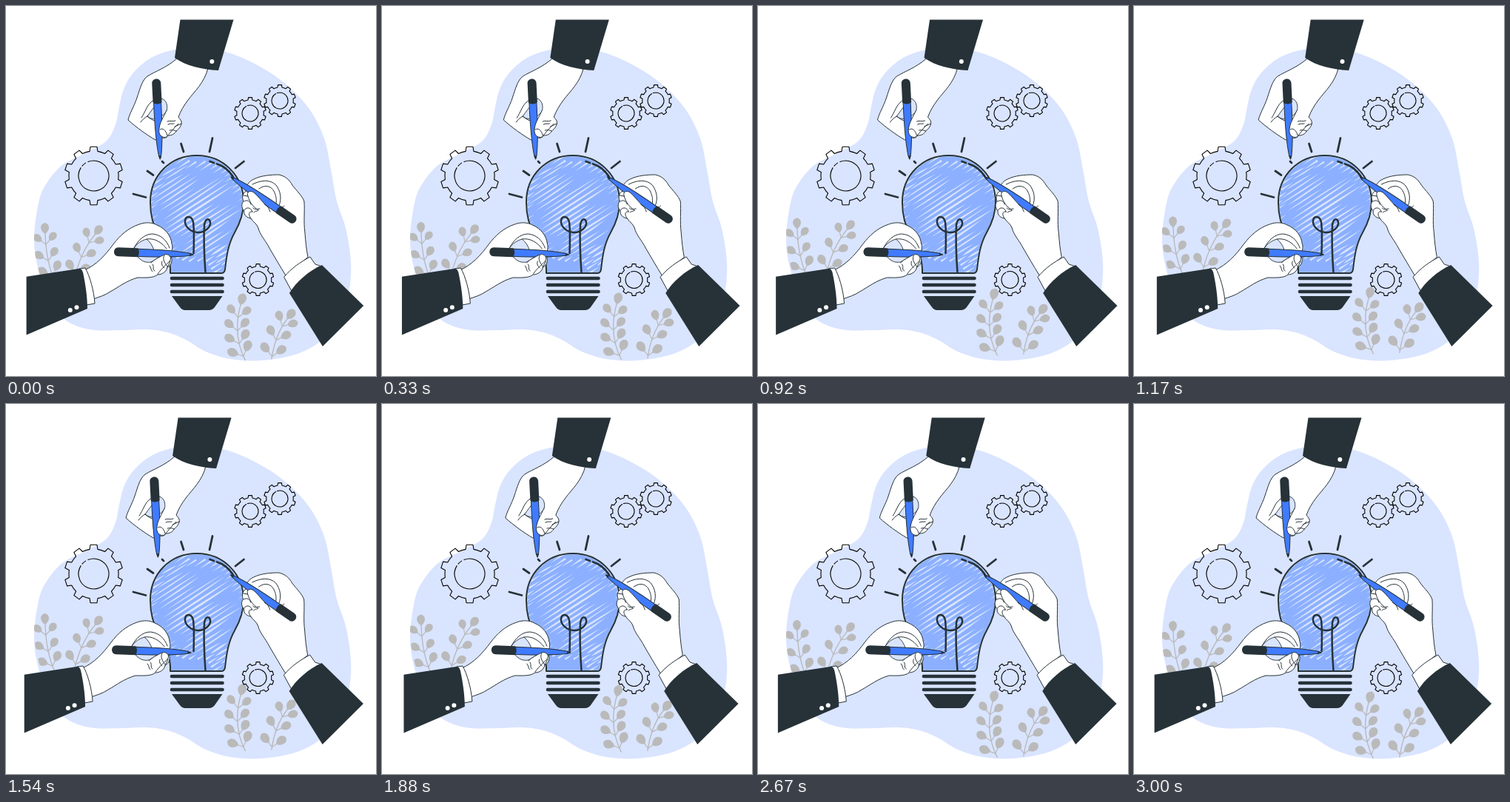
Write an HTML page with a canvas that moves like this. It is 500 px wide and 500 px high and loops after 3040 ms.

```html
<!DOCTYPE html>
<html>
<head>
<meta charset="utf-8">
<style>
html, body { margin: 0; width: 100%; height: 100%; overflow: hidden; background: #fff; }
canvas { display: block; width: 500px; height: 500px; }
</style>
</head>
<body>
<canvas id="stage"></canvas>
<script>
const LOOP = 3040, CYCLE = 3000;
const INK = '#263238', BLUE = '#407bff', PALE = '#d9e4ff', MID = '#8cb0ff', GREY = '#bababa', WHITE = '#fff';

const cv = document.getElementById('stage');
const dpr = window.devicePixelRatio || 1;
cv.width = cv.height = 500 * dpr;
const c = cv.getContext('2d');
c.lineCap = c.lineJoin = 'round';

function shape(d, fill, stroke, width = 1) {
  const p = typeof d === 'string' ? new Path2D(d) : d;
  if (fill) { c.fillStyle = fill; c.fill(p); }
  if (stroke) { c.strokeStyle = stroke; c.lineWidth = width; c.stroke(p); }
}
const line = (d, width = 1, color = INK) => shape(d, null, color, width);
const skin = d => shape(d, WHITE, INK, 1);

function dot(x, y, r, color) {
  const p = new Path2D();
  p.arc(x, y, r, 0, 7);
  shape(p, color);
}

function group(x, y, angle, draw) {
  c.save();
  c.translate(x, y);
  c.rotate(angle);
  draw();
  c.restore();
}

// closed smooth curve through points
function smooth(pts) {
  const p = new Path2D(), n = pts.length, at = i => pts[(i + n) % n];
  p.moveTo(...pts[0]);
  for (let i = 0; i < n; i++) {
    const [a, b, d, e] = [at(i - 1), at(i), at(i + 1), at(i + 2)];
    p.bezierCurveTo(b[0] + (d[0] - a[0]) / 6, b[1] + (d[1] - a[1]) / 6,
      d[0] - (e[0] - b[0]) / 6, d[1] - (e[1] - b[1]) / 6, d[0], d[1]);
  }
  return p;
}

function seeded(s) {
  return () => (s = (s * 16807) % 2147483647) / 2147483647;
}

const blob = smooth([
  [38, 312], [44, 266], [54, 241], [76, 215], [109, 198], [136, 182], [148, 160], [153, 136],
  [160, 110], [174, 88], [198, 69], [228, 59], [262, 57], [297, 62], [336, 78], [375, 103],
  [409, 138], [430, 179], [440, 226], [447, 264], [459, 300], [466, 345], [464, 383],
  [453, 418], [430, 449], [394, 470], [345, 479], [303, 477], [270, 467], [243, 451],
  [218, 441], [190, 437], [155, 438], [120, 438], [92, 431], [70, 415], [54, 387], [42, 349]
]);

const bulb = new Path2D('M222 361 C223 342 216 326 207 311 C199 298 195 282 195 265 C195 229 222 202 258 202 C294 202 321 230 321 265 C321 280 317 292 309 306 C300 322 298 338 296 356 Q295 361 291 361 Z');

function gear(x, y, r, hole, teeth, gaps) {
  const p = new Path2D(), step = Math.PI * 2 / teeth, root = r * 0.85;
  for (let i = 0; i < teeth; i++) {
    const a = i * step - Math.PI / 2;
    for (const [k, q] of [[-0.26, root], [-0.18, r], [0.18, r], [0.26, root]])
      p.lineTo(x + q * Math.cos(a + k * step), y + q * Math.sin(a + k * step));
    p.arc(x, y, root, a + 0.26 * step, a + 0.74 * step);
  }
  p.closePath();
  shape(p, null, '#000', 1.1);
  const h = new Path2D();
  if (gaps) {
    h.arc(x, y, hole, -1.95, 3.7);
    h.moveTo(x + hole * Math.cos(3.85), y + hole * Math.sin(3.85));
    h.arc(x, y, hole, 3.85, 4.15);
  } else h.arc(x, y, hole, -1.9, 4.2);
  shape(h, null, '#000', 1.1);
}

function leaf(x, y, angle, len, stalk) {
  group(x, y, angle, () => {
    line(`M0 0 L${stalk} 0`, 1.2, GREY);
    c.translate(stalk, 0);
    shape(`M0 0 C${len * .3} ${-len * .5} ${len * .9} ${-len * .52} ${len} 0 C${len * .9} ${len * .46} ${len * .3} ${len * .46} 0 0`, GREY);
  });
}

function plant(a, b, d, pairs, len) {
  line(`M${a} Q${b} ${d}`, 1.4, GREY);
  const mix = (i, t) => (1 - t) ** 2 * a[i] + 2 * t * (1 - t) * b[i] + t * t * d[i];
  const slope = (i, t) => (1 - t) * (b[i] - a[i]) + t * (d[i] - b[i]);
  for (let k = 0; k < pairs; k++) {
    const t = 0.14 + 0.66 * k / (pairs - 1);
    const dir = Math.atan2(slope(1, t), slope(0, t));
    const size = len * (1 - 0.12 * k / pairs);
    leaf(mix(0, t), mix(1, t), dir - 0.8, size, 7);
    leaf(mix(0, t), mix(1, t), dir + 0.8, size, 7);
  }
  leaf(d[0], d[1], Math.atan2(slope(1, 1), slope(0, 1)), len, 0);
}

function plants() {
  c.save();
  c.clip(blob);
  plant([66, 372], [54, 345], [53, 308], 3, 15);
  plant([92, 372], [99, 335], [120, 309], 3, 15);
  plant([326, 484], [305, 447], [317, 404], 4, 16);
  plant([358, 484], [362, 446], [380, 423], 3, 16);
  c.restore();
}

function scribble() {
  const rnd = seeded(77);
  c.save();
  c.clip(bulb);
  group(258, 278, 0, () => {
    c.scale(0.98, 0.985);
    c.translate(-258, -278);
    shape(bulb, MID);
  });
  group(258, 275, -0.58, () => {
    for (let y = -70; y < 102; y += 6.3) {
      const half = Math.sqrt(Math.max(400, 4000 - y * y));
      const x = -half * (1.05 - rnd() * 0.45), w = half * (1 + rnd() * 0.8);
      const h = 1.6 + rnd() * 1.4, drift = rnd() * 3 - 1.5;
      shape(`M${x} ${y} Q${x + w * .4} ${y - h} ${x + w} ${y + drift} Q${x + w * .5} ${y + h} ${x} ${y}`, PALE);
      // ragged ends along the glass
      for (const s of [-1, 1])
        shape(`M${s * (half + 8)} ${y + 1.6} L${s * (half - 4 - rnd() * 10)} ${y + 3} L${s * (half + 8)} ${y + 4.2} Z`, PALE);
    }
  });
  c.restore();
}

function lamp() {
  scribble();
  shape(bulb, null, INK, 2);
  line('M275.5 210 L281 212 M285 213.5 C294 216 301 222 307 231', 2.8);
  line('M253.5 334 C254 318 254.500 304 253 292 C251 283 243 283 242 290 C241 299 251 306 260 306 C269 306 277 299 276 292 C275 286 269 287 268 296 C267 316 268 340 269.500 360', 2.5);
  for (const y of [368, 377, 386]) line(`M224 ${y} H292.500`, 4.6);
  shape('M224 392 H292.500 L282 407 Q279 411 274 411 H242 Q238 411 235 407 Z', INK);
  line('M172 254 L189 258.500 M191 223 L199 228.500 M236.500 186 L240 197 M279 178.500 L275 197 M321.500 210 L310 219 M211 210 L213 212', 2.8);
}

// from the cap's end to the tip
function pen(x0, y0, x1, y1, cap) {
  const len = Math.hypot(x1 - x0, y1 - y0);
  group(x0, y0, Math.atan2(y1 - y0, x1 - x0), () => {
    shape(`M${cap - 2} -5 C${cap + 25} -5.200 ${len - 24} -4.800 ${len - 4} -1.500 L${len} 0 L${len - 4} 1.500 C${len - 24} 4.800 ${cap + 25} 5.200 ${cap - 2} 5 Z`, BLUE, INK, 1);
    shape(`M${len - 4} -1.200 L${len} 0 L${len - 4} 1.200 Z`, INK, INK, 0.8);
    shape(`M6 -6 H${cap - 2} Q${cap + 2} 0 ${cap - 2} 6 H6 C-2 6 -2 -6 6 -6 Z`, INK);
  });
}

function topHand() {
  skin('M231 71 C216 84 202 88 191 95 C184 100 181 112 177 124 C173 136 167 145 165 154 C176 164 190 174 202 181 C204 180 205 178 207 175 C211 180 217 179 219 175 C224 175 228 173 230 169 C234 166 238 161 237 156 C236 153 234 152 233 150 C236 142 240 135 246 127 C255 115 268 104 273 84 Z');
  shape('M191 149 C195 143 199 138 203 133 L210 125 C217 127 219 135 217 142 C212 150 199 157 191 149 Z', PALE, INK, 0.9);
  line('M191 149 C187 151 184 154 182 157 M210 125 C201 124 194 130 190 138 C187 144 185 148 183 151 M191 149 C195 153 200 155 206 157');
  pen(203, 98.5, 208.3, 207, 34);
  skin('M217 141 C213 150 208 157 207 165 C205 174 211 179 217 177 C222 171 226 166 233 159');
  line('M208 167 C212 164 216 168 218 175 M218 156 C221 154 225 157 229 155 M219 160 C223 158 225 160 227 159 M221 168 C225 167 228 168 230 169 M228 163 L237 159');
  shape('M235.500 18.600 H307.500 L287 87 C266 86 243 81 228 70 Z', INK);
  dot(278.3, 75, 3, WHITE);
}

function leftHand() {
  skin('M106 357 C122 350 134 337 145 322 C154 310 165 300 180 295 C188 292 197 292 204 296 C216 301 223 311 224 321 C226 326 224 332 222 336 C226 343 224 350 218 353 C217 359 211 363 205 363 C199 368 187 367 178 367 C163 371 152 380 141 386 C134 391 126 393 118 396 Z');
  shape('M173 327 C177 321 183 317 190 315 C195 319 198 324 200 330 H176 Z', PALE, INK, 0.9);
  shape('M178 339 C184 346 190 347 196 346 C202 343 207 339 211 337 Z', PALE, INK, 0.9);
  line('M173 327 C178 317 187 308 198 308 C209 309 217 316 221 327 M190 315 C201 313 211 320 217 328');
  pen(146, 332, 253, 336, 34);
  skin('M196 347 C201 342 208 339 214 336 C220 334 225 340 221 345 C216 350 211 354 205 362');
  line('M214 337 C211 341 214 347 218 352 M211 345 C209 349 212 352 214 354 M198 349 C201 352 197 356 201 358 M194 351 C197 354 195 357 198 359 M222 345 L218 353');
  skin('M99 355 L107 354 C113 364 119 385 120 402 L109 404 Z');
  shape('M27.600 365.700 L98 355 Q102 354 104 360 C107 374 110 392 110 409 L27.600 444.500 Z', INK);
  dot(86.8, 411, 3, WHITE);
  dot(95.5, 407.3, 3, WHITE);
}

function rightHand() {
  skin('M378 364 C370 351 363 339 356 327 C351 317 343 309 341 300 C339 294 334 292 331 287 C325 286 321 282 322 277 C318 273 318 267 321 264 C318 257 321 252 325 250 C324 243 328 237 335 234 C345 229 358 228 369 228 C378 230 383 235 387 242 C393 250 400 256 403 264 C404 276 402 292 404 306 C405 319 406 329 408 339 Z');
  line('M333 241 C345 235 357 234 365 242 C371 250 373 260 369 270 M342 247 C350 241 358 243 362 250 C365 256 366 261 365 267 M369 270 C372 273 375 273 376 270');
  pen(391.5, 291, 304, 231, 30);
  skin('M350 268 C345 263 341 257 335 252 C329 248 325 252 327 257 C329 264 333 271 341 276');
  line('M322 264 C326 261 330 264 331 268 M322 276 C325 271 331 272 333 278 M321 256 L327 257 M331 287 C327 282 328 277 333 278 M334 273 C338 277 340 273 343 274 M335 279 C338 276 340 278 341 276 M350 268 C354 270 356 275 357 278');
  skin('M376 366 C386 354 398 346 411 339 L418 349 L427 352 L388 388 Z');
  shape('M383 388 C392 373 409 358 427 350 L483.300 405 L428 460 Z', INK);
}

const KEYS = [0, -1, 2, -4, 4, -4, 4, -4, 2, -1, 0];
function shake(p) {
  const x = (p % 1) * 10, i = Math.floor(x);
  return KEYS[i] + (KEYS[i + 1] - KEYS[i]) * (x - i);
}

function draw(t) {
  const p = Math.min(t, CYCLE) / CYCLE;
  c.setTransform(dpr, 0, 0, dpr, 0, 0);
  c.fillStyle = WHITE;
  c.fillRect(0, 0, 500, 500);
  shape(blob, PALE);
  group(0, -5 * (1 - Math.cos(2 * Math.PI * p)), 0, plants);
  gear(118.5, 229.5, 39.5, 20.5, 10, true);
  gear(330, 145, 21.5, 11, 10);
  gear(370, 128, 21.5, 11, 10);
  gear(340.5, 370, 21.5, 11.5, 10);
  lamp();
  const dx = shake(p);
  group(dx, 0, 0, topHand);
  group(dx, 0, 0, leftHand);
  group(shake(p * 2 + 0.008), 0, 0, rightHand);
}

function tick() {
  draw(performance.now() % LOOP);
  requestAnimationFrame(tick);
}
tick();
</script>
</body>
</html>
```
